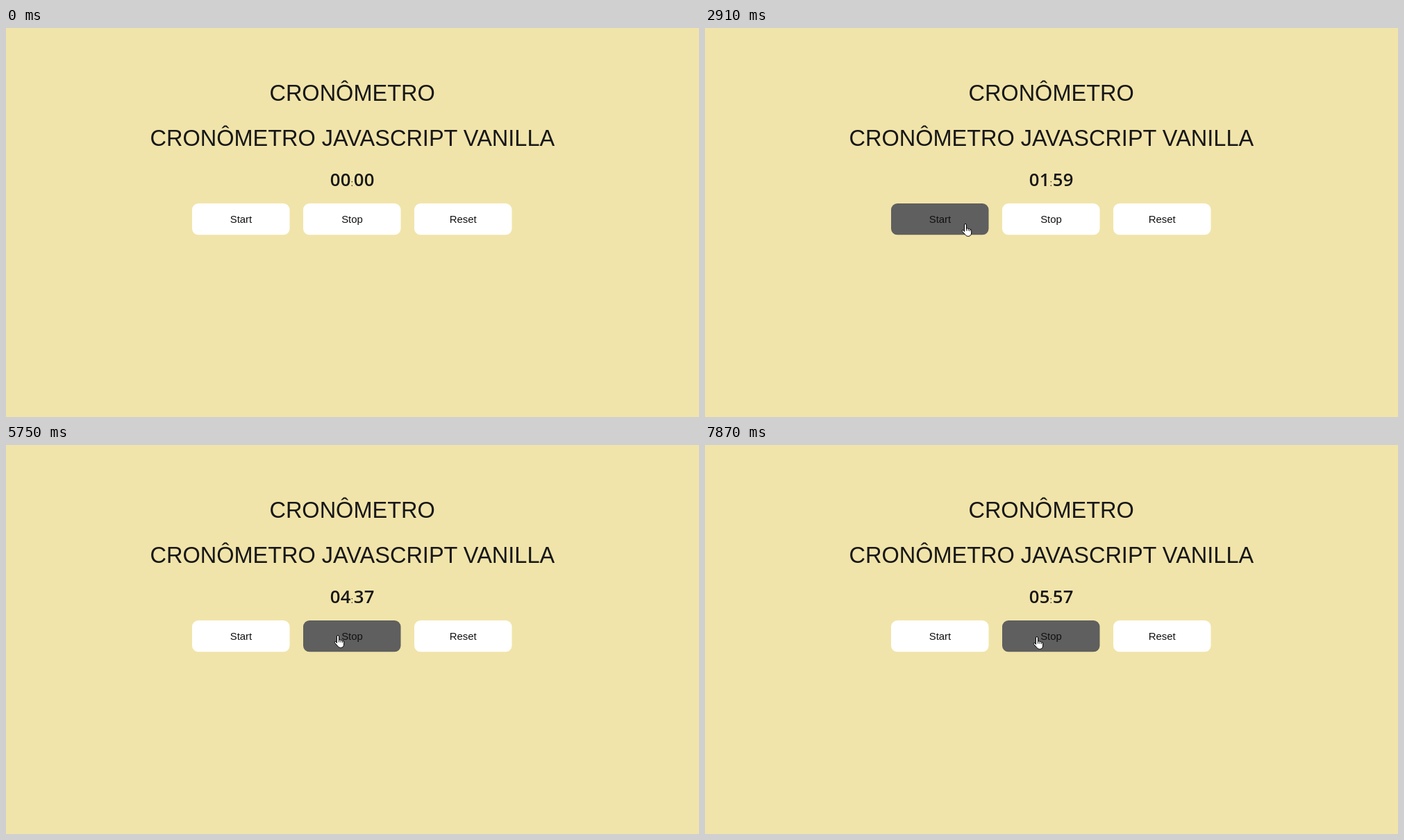
An HTML page that plays this animation: 998 by 561 pixels, repeating every 8000 ms.

```html
<!DOCTYPE html>
<html lang="pt-BR">
<head>
<meta charset="utf-8">
<title>Cronômetro</title>
<style>
  html, body { margin: 0; width: 100%; height: 100%; overflow: hidden; background: #f1e4aa; }
  svg { display: block; width: 100vw; height: 100vh; }
  text { font-family: "Liberation Sans", Arial, sans-serif; fill: #171717; text-anchor: middle; }
  .title { font-size: 32.5px; }
  .digits { font: 600 25.7px "Open Sans", "Noto Sans", sans-serif; letter-spacing: .3px; }
  .colon { font-size: 13px; }
  .button rect { width: 140.5px; height: 45.3px; rx: 9px; fill: #fff; }
  .button.hover rect { fill: #5f5f5f; }
  .button text { font-size: 14.9px; fill: #111; }
  #cursor path { fill: #fff; stroke: #000; stroke-linejoin: round; }
  #hand .creases { fill: none; stroke-width: .9; }
</style>
</head>
<body>
<svg viewBox="0 0 998 561">
  <text class="title" x="498.6" y="105.4">CRONÔMETRO</text>
  <text class="title" x="498.8" y="170.2">CRONÔMETRO JAVASCRIPT VANILLA</text>

  <text class="digits" id="seconds" x="481.8" y="227.6">00</text>
  <text class="colon" x="498.2" y="227.6">:</text>
  <text class="digits" id="hundredths" x="515.7" y="227.6">00</text>

  <g class="button" transform="translate(268 253)"><rect/><text x="70.5" y="27.7">Start</text></g>
  <g class="button" transform="translate(428 253)"><rect/><text x="70.5" y="27.7">Stop</text></g>
  <g class="button" transform="translate(588 253)"><rect/><text x="70.2" y="27.7">Reset</text></g>

  <g id="cursor">
    <path id="arrow" d="M.5 .5V16.3L4.2 12.8L6.6 18.3L9 17.2L6.6 11.9H11.6Z"/>
    <g id="hand">
      <path d="M-1.5 11.5V2a1.5 1.5 0 0 1 3 0v5q2.3-.5 2.6.6q2-.4 2.4.8q2.2-.2 2.2 1.6V13q0 5.4-5 5.4q-2.6 0-4.2-2.6l-3.8-4.3q-.9-1.5.2-2.1q1.1-.4 2.6 2.1z"/>
      <path class="creases" d="M1.5 7v3.5M4.1 7.8v2.9M6.5 8.7v2.5"/>
    </g>
  </g>
</svg>
<script>
  const LOOP = 8000, FIRST = 482, STEP = 101.1;  // ms; the screen refreshes once per STEP
  const RATE = 9.94;                             // hundredths counted per refresh
  const ENTRY = { x: 963, y: 522 };

  // Pointer moves, timed in refreshes
  const moves = [
    { from: 0, to: 7, x: 366, y: 281 },
    { from: 8, to: 24, x: 375, y: 282 },
    { from: 42, to: 50, x: 478, y: 274 },
    { from: 56, to: 59, x: 377, y: 269 },
    { from: 69, to: 73, x: 478, y: 276 }
  ];

  const $ = id => document.getElementById(id);
  const buttons = [...document.querySelectorAll(".button")];
  const clamp = (v, max) => Math.min(max, Math.max(0, v));
  const easeOut = p => 1 - (1 - p) ** 2;
  const pad = n => String(n).padStart(2, "0");
  const show = (el, on) => { el.style.display = on ? "" : "none"; };

  function pointerAt(k) {
    let { x, y } = ENTRY;
    for (const m of moves) {
      const p = easeOut(clamp((k - m.from) / (m.to - m.from), 1));
      x += (m.x - x) * p;
      y += (m.y - y) * p;
    }
    return [Math.round(x), Math.round(y)];
  }

  // Two runs of the stopwatch with a pause between them
  const countAt = k => Math.round(RATE * (clamp(k - 8, 44) + clamp(k - 61, 12)));

  function draw(time) {
    const k = Math.floor((time - FIRST) / STEP);
    const count = countAt(k);
    $("seconds").textContent = pad(Math.floor(count / 100));
    $("hundredths").textContent = pad(count % 100);

    const [x, y] = pointerAt(k);
    const inRow = k >= 0 && y >= 253 && y < 298;
    let over = false;
    buttons.forEach((button, i) => {
      const dx = x - 268 - 160 * i;
      const hit = inRow && dx >= 0 && dx < 140;
      button.classList.toggle("hover", hit);
      over = over || hit;
    });
    show($("cursor"), k >= 0);
    show($("hand"), over);
    show($("arrow"), !over);
    $("cursor").setAttribute("transform", `translate(${x} ${y})`);
  }

  const start = performance.now();
  function tick() {
    draw((performance.now() - start) % LOOP);
    requestAnimationFrame(tick);
  }
  tick();
</script>
</body>
</html>
```
